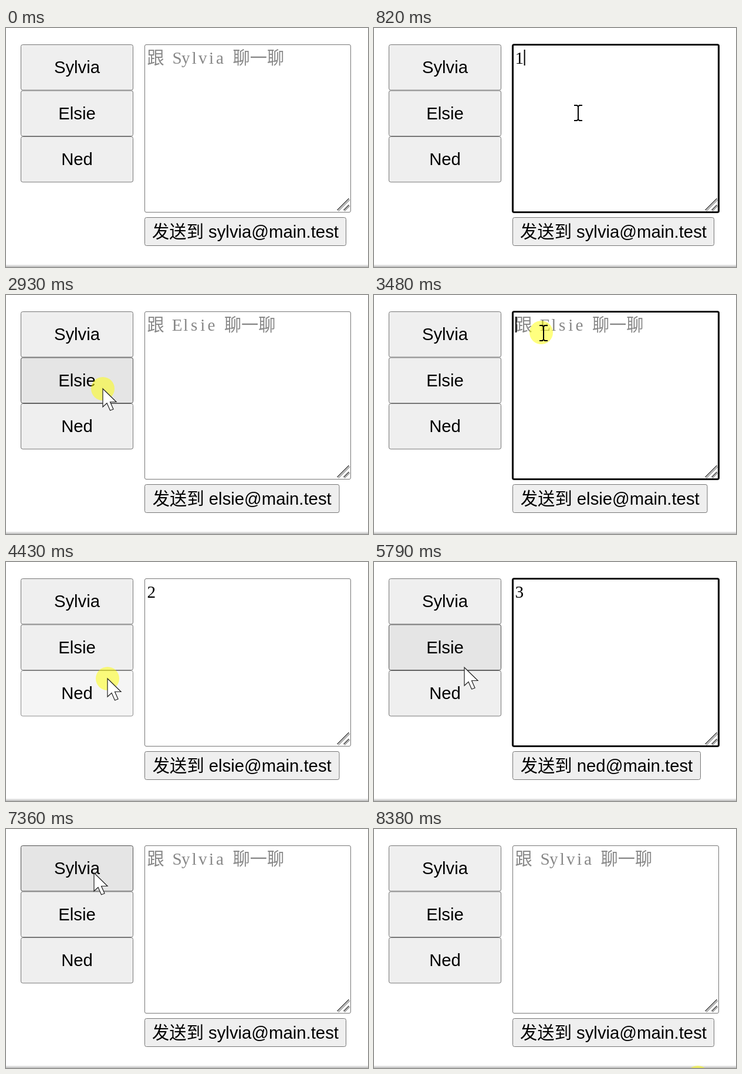
Recreate the animation shown at these times as an HTML page. Size 617 by 408 pixels, loop 8500 ms.

```html
<!DOCTYPE html>
<html lang="zh">
<head>
<meta charset="utf-8">
<title>Chat</title>
<style>
html, body { margin: 0; width: 100%; height: 100%; overflow: hidden; background: #fff; }
svg { display: block; width: 100%; height: 100%; }
text { text-anchor: middle; }
.ui { font: 29.3px "Liberation Sans", "Noto Sans CJK SC", "Noto Sans CJK", sans-serif; }
.area { font: 300 29.2px "Liberation Serif", "Noto Sans CJK SC", "Noto Sans CJK", serif; }
</style>
</head>
<body>
<svg viewBox="0 0 617 408">
  <rect y="404" width="617" height="4" fill="#e6e6e6"/>
  <rect y="406.5" width="617" height="1.2" fill="#b4b4b4"/>
  <g id="buttons"></g>
  <rect id="box" fill="#fff"/>
  <g fill="none" stroke-width="1.6">
    <path d="M566.5 312.5L586 293M577 312.5L586 303.5" stroke="#9a9a9a"/>
    <path d="M564.5 311L584.5 291M575.5 311L584.5 302" stroke="#454545"/>
  </g>
  <text id="area" class="area" y="61"></text>
  <rect id="caret" y="37" width="2" height="27"/>
  <circle id="ring" r="20" fill="#ff0" fill-opacity=".5"/>
  <path id="arrow" d="M0 0V31L7 24.5L12.5 37L18 35L12.5 22.5H23Z" fill="#fff" stroke="#222" stroke-width="1.2"/>
  <path id="beam" d="M-7-13h5l2 2 2-2h5M0-11V11M-7 13h5l2-2 2 2h5" fill="none" stroke="#000" stroke-width="2"/>
</svg>
<script>
const LOOP = 8500, STEP = 70, BLINK = 530, RING = 200, CELL = 14.6;
const names = ['Sylvia', 'Elsie', 'Ned'];
const $ = id => document.getElementById(id);
const show = (el, on) => el.setAttribute('visibility', on ? 'visible' : 'hidden');
const set = (el, attrs) => { for (const k in attrs) el.setAttribute(k, attrs[k]); };
const inside = (r, x, y) => x >= r.x && x < r.x + r.w && y >= r.y && y < r.y + r.h;

function makeButton(x, y, w, h, text) {
  const [rect, label] = ['rect', 'text'].map(tag =>
    $('buttons').appendChild(document.createElementNS('http://www.w3.org/2000/svg', tag)));
  set(label, { class: 'ui', y: y + h / 2 + 10 });
  label.textContent = text;
  return { x, y, w, h, rect, label };
}

const side = names.map((name, i) => makeButton(25, 28 + 78.5 * i, 192, 78.5, name));
const send = makeButton(236, 323, 344, 49, '');
const box = { x: 236, y: 28, w: 352, h: 287 };

// Where the pointer goes, when it arrives, and what is done there
const visits = [
  { at: 620, x: 344, y: 144, keys: '111', times: [820, 1150, 1350] },
  { at: 1960, x: 460, y: 215, idle: true },
  { at: 2440, x: 357, y: 284, idle: true },
  { at: 2790, x: 165, y: 160 },
  { at: 3410, x: 285, y: 64, keys: '2', times: [3810] },
  { at: 4430, x: 173, y: 199, hold: 70 },
  { at: 4770, x: 362, y: 81, keys: '3', times: [5170] },
  { at: 5790, x: 154, y: 180, wait: 130, hold: 290 },
  { at: 6420, x: 272, y: 94, idle: true },
  { at: 7160, x: 150, y: 75, travel: 280 },
  { at: 8380, x: 552, y: 424, travel: 740 }
];

let from = { x: 540, y: 335, up: 0 };
for (const v of visits) {
  const { wait = 0, hold = 130, travel = 420 } = v;
  v.from = from;
  v.down = v.idle ? Infinity : v.at + wait;
  v.up = v.idle ? v.at : v.down + hold;
  v.leave = Math.max(from.up, v.at - travel);
  v.target = side.findIndex(b => inside(b, v.x, v.y));
  from = v;
}

// The pointer advances in visible steps
function pointer(t) {
  const v = visits.filter(e => e.leave <= t).pop() || from;
  const time = v.at - Math.ceil((v.at - t) / STEP) * STEP;
  const u = v === from && t < v.leave ? 1
    : Math.min(1, Math.max(0, (time - v.leave) / (v.at - v.leave)));
  const e = u * u * (3 - 2 * u);
  return [v.from.x + (v.x - v.from.x) * e, v.from.y + (v.y - v.from.y) * e];
}

function stateAt(t) {
  const s = { who: 0, text: '', focused: false, since: 0, down: false, ring: false };
  for (const v of visits) {
    if (t < v.down || v.idle) continue;
    s.focused = inside(box, v.x, v.y);
    s.since = v.down;
    s.down = t < v.up;
    s.ring = t < Math.max(v.up, v.down + RING);
    if (v.target >= 0 && !s.down) {
      s.who = v.target;
      s.text = '';
    }
    if (v.keys) s.text += v.keys.slice(0, v.times.filter(k => k <= t).length);
  }
  return s;
}

function drawButton(b, x, y, down) {
  const over = inside(b, x, y);
  set(b.rect, {
    x: b.x + .5, y: b.y + .5, width: b.w - 1, height: b.h - 1, rx: 3,
    fill: !over ? '#efefef' : down ? '#f5f5f5' : '#e5e5e5',
    stroke: !over ? '#767676' : down ? '#8d8d8d' : '#4f4f4f'
  });
  b.label.setAttribute('x', b.x + b.w / 2);
}

// Full-width and half-width cells
function drawArea(str, fill) {
  let x = 240.5;
  const centers = [...str].map(c => {
    const w = c > '\u2fff' ? 2 * CELL : CELL;
    x += w;
    return (x - w / 2).toFixed(1);
  });
  $('area').textContent = str;
  set($('area'), { x: centers.join(' '), fill });
}

function draw(t) {
  const { who, text, focused, since, down, ring } = stateAt(t);
  const [x, y] = pointer(t), over = inside(box, x, y);

  side.forEach(b => drawButton(b, x, y, down));
  send.w = 344 - 11.5 * who;
  send.label.textContent = `发送到 ${names[who].toLowerCase()}@main.test`;
  drawButton(send, x, y, false);

  set($('box'), {
    x: box.x + .5, y: box.y + .5, width: box.w - 1, height: box.h - 1,
    rx: 2.5, 'stroke-width': focused ? 3.2 : 1,
    stroke: focused ? '#101010' : over ? '#4f4f4f' : '#767676'
  });
  if (text) drawArea(text, '#000');
  else drawArea(`跟 ${names[who]} 聊一聊`, '#888');
  $('caret').setAttribute('x', 241 + text.length * CELL);
  show($('caret'), focused && (t - since) % (2 * BLINK) < BLINK);

  set($('ring'), { cx: x, cy: y });
  show($('ring'), ring);
  $('arrow').setAttribute('transform', `translate(${x} ${y})`);
  $('beam').setAttribute('transform', `translate(${x + 4} ${y + 1})`);
  show($('arrow'), !over);
  show($('beam'), over);
}

const begin = performance.now();
function tick() {
  draw((performance.now() - begin) % LOOP);
  requestAnimationFrame(tick);
}
tick();
</script>
</body>
</html>
```
